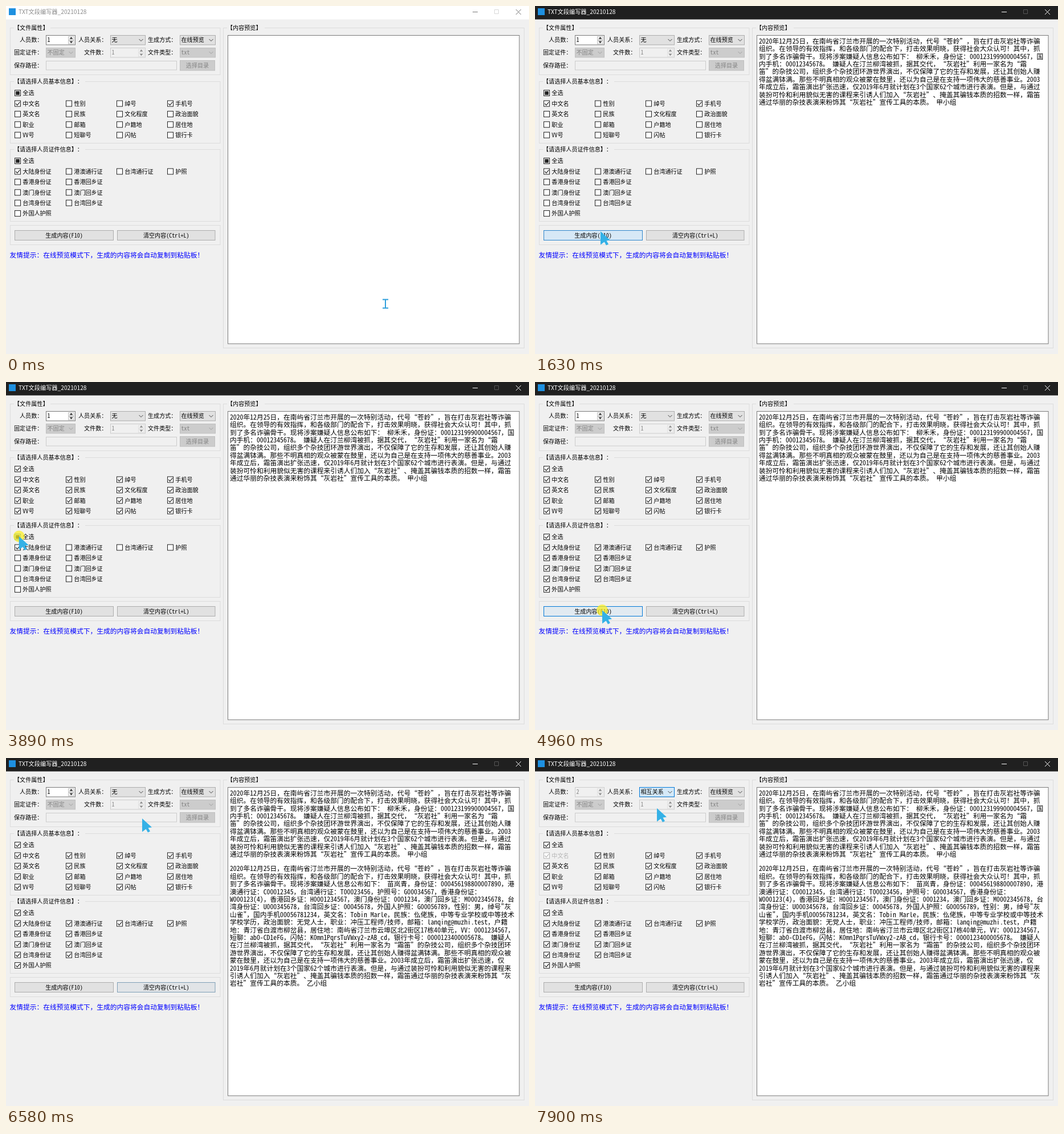
An HTML page that plays this animation: 918x610 px, repeating every 7990 ms.

```html
<!DOCTYPE html>
<html lang="zh-CN">
<head>
<meta charset="utf-8">
<style>
html, body { margin: 0; width: 100%; height: 100%; overflow: hidden; background: #f0f0f0; }
svg { display: block; width: 918px; height: 610px; }
text {
  font-family: "Noto Sans Mono CJK SC", "Noto Sans CJK SC", "Noto Sans CJK", monospace;
  font-size: 10.08px; white-space: pre; text-spacing-trim: space-all; text-autospace: no-autospace;
}
.title { font-family: "Noto Sans CJK SC", "Noto Sans CJK", "Noto Sans", sans-serif; font-size: 10.2px; }
.body { font-size: 11.76px; }
</style>
</head>
<body>
<svg id="stage" viewBox="0 0 918 610"></svg>
<script>
const LOOP = 7990, GENERATED = 1330, REGENERATED = 5120, SELECTED = 7900;
const BASIC_ALL = 2860, PAPERS_ALL = 3960;
const BLUE = '#0078d7', GREY = '#838383';
const stage = document.getElementById('stage');
const timed = [];

function el(tag, attrs, parent = stage) {
  const node = document.createElementNS('http://www.w3.org/2000/svg', tag);
  for (const key in attrs) node.setAttribute(key, attrs[key]);
  return parent.appendChild(node);
}
// Show a node only during [from, to)
function during(node, from, to = LOOP) {
  timed.push([node, from, to]);
  return node;
}
const group = (parent = stage) => el('g', {}, parent);
const box = (x, y, w, h, fill, stroke, parent) =>
  el('rect', { x: x + .5, y: y + .5, width: w, height: h, fill, stroke }, parent);
const line = (d, stroke, parent, width = 1) =>
  el('path', { d, stroke, fill: 'none', 'stroke-width': width }, parent);
// y is the vertical middle of the glyphs
function label(x, y, str, fill = '#000', parent = stage, attrs = {}) {
  const size = attrs.class === 'body' ? 11.76 : 10.08;
  const node = el('text', { x, y: y + size * .37, fill, ...attrs }, parent);
  node.textContent = str;
  return node;
}
const middle = { 'text-anchor': 'middle' };

function titleBar(bg, fg, dim, from, to) {
  const g = during(group(), from, to);
  el('rect', { width: 918, height: 23.5, fill: bg }, g);
  el('rect', { x: 5, y: 4, width: 12, height: 12, fill: '#1e90e0' }, g);
  label(22, 10.3, 'TXT文段编写器_20210128', bg === '#fff' ? '#8c8c8c' : fg, g, { class: 'title' });
  line('M819 10.5h9', fg, g);
  line('M857.5 6.5h7v7h-7z', dim, g);
  line('M895 6l9 9M904 6l-9 9', fg, g);
}

function frame(x, y, w, h, title, titleWidth) {
  box(x, y, w, h, 'none', '#dcdcdc');
  if (!title) return;
  el('rect', { x: x + 7, y: y - 3, width: titleWidth, height: 7, fill: '#f0f0f0' });
  label(x + 7, y, title);
}

function combo(x, y, w, value, enabled = true, parent = stage) {
  const g = group(parent);
  box(x, y, w, 16.5, enabled ? '#e1e1e1' : '#ccc', enabled ? '#adadad' : '#bfbfbf', g);
  chevron(x + w - 7, y + 9, enabled, g);
  if (value) label(x + 2.5, y + 8.5, value, enabled ? '#000' : GREY, g);
  return g;
}
const chevron = (x, y, enabled, parent) =>
  line(`M${x - 3.5} ${y - 2}l3.5 3.5l3.5-3.5`, enabled ? '#444' : '#a0a0a0', parent);

function spinner(x, y, w, value, enabled) {
  const g = group(), ink = enabled ? '#333' : '#8a8a8a';
  box(x, y, w, 16.5, enabled ? '#fff' : '#f0f0f0', enabled ? '#7a7a7a' : '#ccc', g);
  label(x + 2.5, y + 8.5, value, enabled ? '#000' : GREY, g);
  const bx = x + w - 12;
  box(bx, y + 2, 10, 6, '#f0f0f0', enabled ? '#c8c8c8' : '#e2e2e2', g);
  box(bx, y + 9, 10, 6, '#f0f0f0', enabled ? '#c8c8c8' : '#e2e2e2', g);
  el('path', { d: `M${bx + 2.5} ${y + 6.7}l3-3.4l3 3.4zM${bx + 2.5} ${y + 10.8}l3 3.4l3-3.4z`, fill: ink }, g);
  return g;
}

function tick(x, y, ink, parent) {
  return line(`M${x - 3.3} ${y}l2.5 2.8l4.6-5.4`, ink, parent, 1.2);
}
function checkbox(x, y, name, checkedFrom, ink = '#222', parent = stage) {
  const g = group(parent);
  box(x - 5, y - 5.5, 10, 10, '#fff', ink, g);
  if (name) label(x + 9.3, y, name, ink === '#222' ? '#000' : ink, g);
  during(tick(x + .5, y, ink, g), checkedFrom);
  return g;
}
function selectAll(y, checkedFrom) {
  checkbox(20, y, '全选', checkedFrom);
  during(el('rect', { x: 17.2, y: y - 3.2, width: 6.6, height: 6.6, fill: '#222' }), 0, checkedFrom);
}
const outline = (y, from, to) => during(box(15, y - 5.5, 10, 10, 'none', BLUE), from, to);

function button(x, y, w, h, str, bg = '#e1e1e1', stroke = '#adadad', ink = '#000', parent = stage) {
  const g = group(parent);
  box(x, y, w, h, bg, stroke, g);
  label(x + w / 2 + .5, y + h / 2 + .5, str, ink, g, middle);
  return g;
}

function paragraph(y, lines, from) {
  const g = during(group(), from);
  lines.forEach((str, i) => label(393, y + i * 13.4, str, '#000', g, { class: 'body' }));
}

titleBar('#fff', '#777', '#d8d8d8', 0, 1170);
titleBar('#202020', '#fff', '#555', 1170);

frame(7, 38, 368.5, 82, '【文件属性】', 64);
label(24, 59.5, '人员数：');
during(spinner(70, 51, 51, '1', true), 0, SELECTED);
during(spinner(70, 51, 51, '2', false), SELECTED);
label(127, 59.5, '人员关系：');
combo(183, 51, 61);
const comboHover = during(group(), 6760);
box(183, 51, 61, 16.5, '#d5e9f8', BLUE, comboHover);
chevron(237, 60, true, comboHover);
during(label(185.5, 59.5, '无'), 0, SELECTED);
during(label(185.5, 59.5, '相互关系'), SELECTED);
label(249, 59.5, '生成方式：');
combo(305, 51, 62, '在线预览');

label(14, 81.5, '固定证件：');
combo(70, 73, 51, '不固定', false);
label(137, 81.5, '文件数：');
spinner(183, 73, 61, '1', false);
label(249, 81.5, '文件类型：');
combo(305, 73, 62, 'txt', false);

label(14, 104.5, '保存路径：');
box(70, 96, 229, 15.5, '#f0f0f0', '#ccc');
button(305, 95, 61, 17.5, '选择目录', '#ccc', '#bfbfbf', GREY);

const columns = [20, 110, 199, 288];
frame(7, 132, 368.5, 108, '【请选择人员基本信息】：', 125);
selectAll(152.5, BASIC_ALL);
[['中文名', '性别', '绰号', '手机号'], ['英文名', '民族', '文化程度', '政治面貌'],
 ['职业', '邮箱', '户籍地', '居住地'], ['VV号', '短聊号', '闪帖', '银行卡']].forEach((row, r) =>
  row.forEach((name, c) => {
    const g = checkbox(columns[c], 171 + r * 18.4, name, r === 0 && c % 3 === 0 ? 0 : BASIC_ALL);
    if (name === '中文名') during(g, 0, SELECTED);
  }));
during(checkbox(20, 171, '中文名', SELECTED, '#b4b4b4'), SELECTED);

frame(7, 251, 368.5, 126, '【请选择人员证件信息】：', 125);
selectAll(271.5, PAPERS_ALL);
[['大陆身份证', '港澳通行证', '台湾通行证', '护照'], ['香港身份证', '香港回乡证'],
 ['澳门身份证', '澳门回乡证'], ['台湾身份证', '台湾回乡证'], ['外国人护照']].forEach((row, r) =>
  row.forEach((name, c) => checkbox(columns[c], 290 + r * 18.4, name, r + c === 0 ? 0 : PAPERS_ALL)));

outline(171, 560, 900);
outline(152.5, 2690, 3200);
outline(271.5, 3650, 4200);

frame(7, 384, 368.5, 34);
const generate = [15, 393, 173, 17, '生成内容(F10)'], clear = [195, 393, 171.5, 17, '清空内容(Ctrl+L)'];
button(...generate);
button(...clear);
during(button(...generate, '#d6e8f6', '#2f86cc'), 1050, 2330);
during(button(...generate, '#e1eaf1', BLUE), 4560, 5940);
const clearHover = during(button(...clear, '#e1effa', BLUE), 6030, 6700);

label(6.5, 437, '友情提示：在线预览模式下，生成的内容将会自动复制到粘贴板！', '#00f', stage, { class: 'body' });

frame(381, 38, 528, 561, '【内容预览】', 66);
box(389, 51, 511.5, 540.5, '#fff', '#7a7a7a');

const opening = [
  '2020年12月25日，在南屿省汀兰市开展的一次特别活动，代号“苍岭”，旨在打击灰岩社等诈骗',
  '组织。在领导的有效指挥，和各级部门的配合下，打击效果明晓，获得社会大众认可！其中，抓'
];
const suspect = '到了多名诈骗骨干。现将涉案嫌疑人信息公布如下： ';
paragraph(61.5, [
  ...opening,
  suspect + '柳禾禾，身份证：000123199900004567，国',
  '内手机：00012345678。 嫌疑人在汀兰柳湾被抓，据其交代，“灰岩社”利用一家名为“霜',
  '笛”的杂技公司，组织多个杂技团环游世界演出，不仅保障了它的生存和发展，还让其创始人赚',
  '得盆满钵满。那些不明真相的观众被蒙在鼓里，还以为自己是在支持一项伟大的慈善事业。2003',
  '年成立后，霜笛演出扩张迅速，仅2019年6月就计划在3个国家62个城市进行表演。但是，与通过',
  '装扮可怜和利用貌似无害的课程来引诱人们加入“灰岩社”、掩盖其骗钱本质的招数一样，霜笛',
  '通过华丽的杂技表演来粉饰其“灰岩社”宣传工具的本质。 甲小组'
], GENERATED);
paragraph(194, [
  ...opening,
  suspect + '苗岚青，身份证：000456198800007890，港',
  '澳通行证：C00012345，台湾通行证：T00023456，护照号：G00034567，香港身份证：',
  'W000123(4)，香港回乡证：H0001234567，澳门身份证：0001234，澳门回乡证：M0002345678，台',
  '湾身份证：U000345678，台湾回乡证：00045678，外国人护照：G00056789，性别：男，绰号"灰',
  '山雀"，国内手机00056781234，英文名：Tobin Marle，民族：仫佬族，中等专业学校或中等技术',
  '学校学历，政治面貌：无党人士，职业：冲压工程师/技师，邮箱：lanqing@muzhi.test，户籍',
  '地：青汀省白渡市柳岔县，居住地：南屿省汀兰市云埠区北2街区17栋40单元，VV：0001234567，',
  '短聊：ab0-CD1eFG，闪帖：K0mn1PqrsTuVWxy2-zAB_cd，银行卡号：0000123400005678。 嫌疑人',
  '在汀兰柳湾被抓，据其交代，“灰岩社”利用一家名为“霜笛”的杂技公司，组织多个杂技团环',
  '游世界演出，不仅保障了它的生存和发展，还让其创始人赚得盆满钵满。那些不明真相的观众被',
  '蒙在鼓里，还以为自己是在支持一项伟大的慈善事业。2003年成立后，霜笛演出扩张迅速，仅',
  '2019年6月就计划在3个国家62个城市进行表演。但是，与通过装扮可怜和利用貌似无害的课程来',
  '引诱人们加入“灰岩社”、掩盖其骗钱本质的招数一样，霜笛通过华丽的杂技表演来粉饰其“灰',
  '岩社”宣传工具的本质。 乙小组'
], REGENERATED);

// Relation drop-down; the highlight follows the pointer to the second item
const list = during(group(), 7090, SELECTED);
box(183, 69, 61, 23, '#fff', BLUE, list);
['无', '相互关系'].forEach((name, i) => {
  const y = 70 + i * 11, [from, to] = i ? [7360, SELECTED] : [0, 7360];
  label(185.5, y + 5.5, name, '#000', list);
  const lit = during(group(list), from, to);
  el('rect', { x: 184, y, width: 60, height: 11, fill: BLUE }, lit);
  label(185.5, y + 5.5, name, '#fff', lit);
});

const pointer = group();
[[1170, 1400], [2780, 3040], [3800, 4040], [4960, 5200], [7010, 7240], [7750, SELECTED]].forEach(([from, to]) =>
  during(el('circle', { r: 10, fill: '#fbee1e', opacity: .72 }, pointer), from, to));
const arrow = el('path', { d: 'M0 0L17 15.5L10.5 16.5L14 22.5L10 24.5L6.7 18.5L0 23.5Z', fill: '#35b1e6' }, pointer);
const beam = line('M-5-7.5h10M0-7.5v15M-5 7.5h10', '#2f9fdc', pointer, 2);

// time, x, y
const path = [
  [0, 666, 522], [80, 640, 506], [240, 400, 360], [480, 130, 200], [640, 45, 172], [720, 48, 212],
  [800, 61, 261], [880, 86, 322], [960, 106, 367], [1120, 115, 395], [2240, 115, 395],
  [2400, 90, 300], [2560, 45, 190], [2720, 21, 155], [2880, 20, 152], [3120, 21, 153],
  [3280, 36, 180], [3440, 42, 220], [3600, 36, 255], [3760, 23, 270], [4080, 22.5, 271],
  [4240, 40, 300], [4400, 80, 360], [4560, 112, 394], [4640, 118, 400], [4960, 118, 400],
  [5280, 117, 397], [5840, 117, 397], [5920, 138, 400], [6080, 205, 398], [6240, 238, 330],
  [6400, 240, 210], [6560, 239, 106], [6720, 237, 72], [6880, 232, 62], [7200, 232, 62],
  [7360, 220, 82], [7440, 214, 88], [8080, 214, 88]
];
function along(t) {
  const i = path.findIndex(p => p[0] > t);
  const [t0, x0, y0] = path[i - 1], [t1, x1, y1] = path[i];
  const k = (t - t0) / (t1 - t0);
  return [x0 + (x1 - x0) * k, y0 + (y1 - y0) * k];
}

function draw(t) {
  for (const [node, from, to] of timed) node.style.display = t >= from && t < to ? '' : 'none';
  const [x, y] = along(Math.floor((t + 30) / 80) * 80);
  pointer.setAttribute('transform', `translate(${x} ${y})`);
  const overText = x > 389;
  beam.style.display = overText ? '' : 'none';
  arrow.style.display = overText ? 'none' : '';
  clearHover.style.opacity = Math.max(0, Math.min(1, 1 - (t - 6300) / 380));
}

const start = performance.now();
function tickFrame() {
  draw((performance.now() - start) % LOOP);
  requestAnimationFrame(tickFrame);
}
tickFrame();
</script>
</body>
</html>
```
